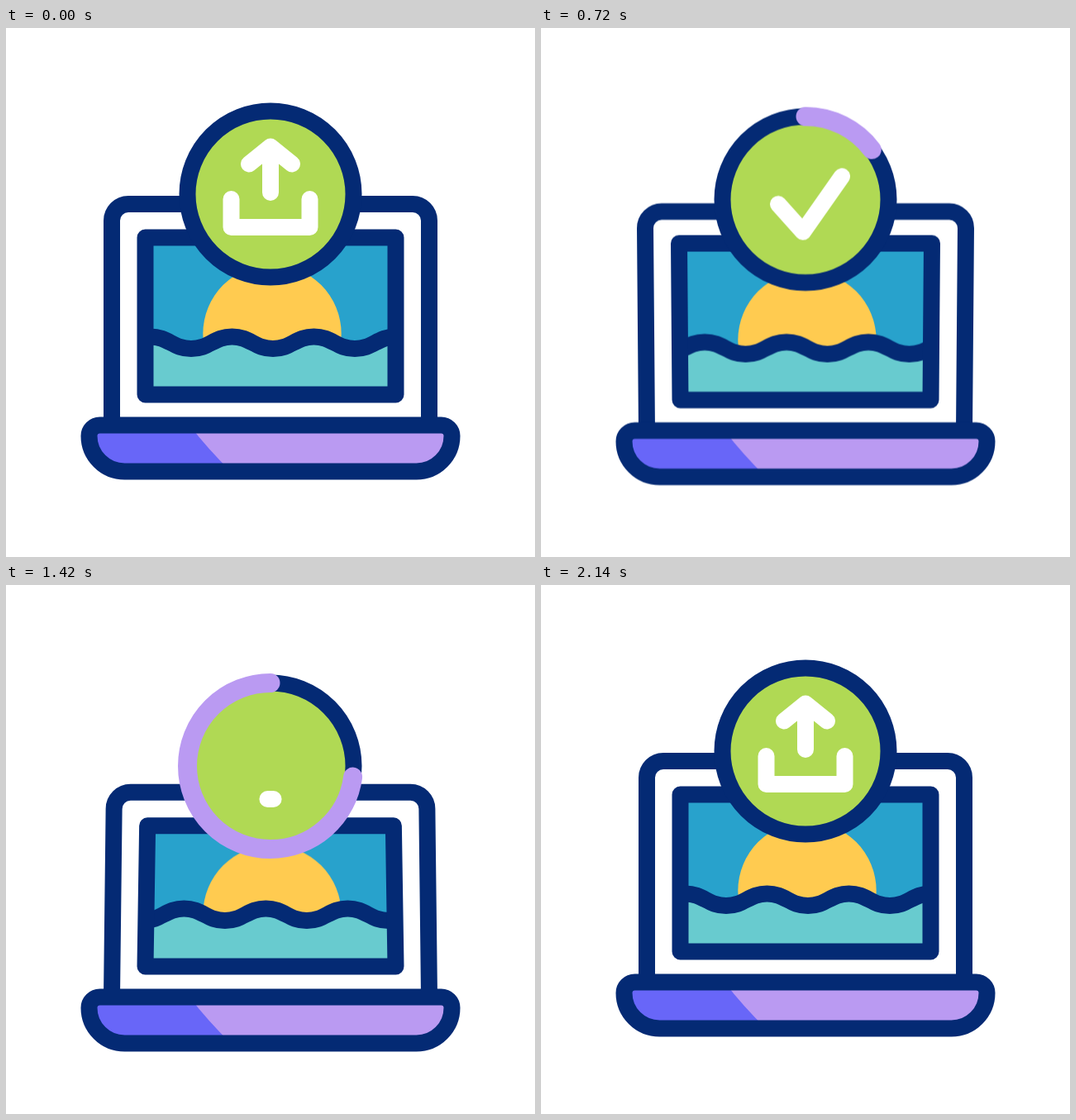
Write an HTML page without scripts that moves like this. It is 640 px wide and 640 px high and loops after 2.3 s.

```html
<!DOCTYPE html>
<html lang="en">
<head>
<meta charset="utf-8">
<title>Laptop upload</title>
<style>
html, body { margin: 0; width: 100%; height: 100%; overflow: hidden; background: #fff; }
svg { display: block; width: 100vw; height: 100vh; }

.line { fill: none; stroke: #042a74; stroke-width: 20; stroke-linejoin: round; }
.glyph { fill: none; stroke: #fff; stroke-width: 20; stroke-linecap: round; stroke-linejoin: round; }
.draw { stroke-dasharray: 100 200; }

.all, .lid, .screen, .sun, .wave, .arrow, .tray, .check, .progress {
  animation: 2.3s cubic-bezier(.37, 0, .63, 1) infinite;
}
.all { animation-name: bob; }
.lid { animation-name: lid; }
.screen { animation-name: screen; }
.sun { animation-name: sun; }
.wave { animation-name: wave; }
.arrow { animation-name: arrow; }
.tray { animation-name: tray; }
.check { animation-name: check; }
.progress { animation-name: progress; }

@keyframes bob {
  0%, 9.2% { transform: translateY(0); }
  19.13% { transform: translateY(-12px); animation-timing-function: cubic-bezier(.4, 0, .6, .65); }
  31.3% { transform: translateY(6.5px); animation-timing-function: cubic-bezier(.3, .6, .6, 1); }
  55.65%, 56.52% { transform: translateY(22.3px); animation-timing-function: cubic-bezier(.45, 0, .7, .5); }
  67.83% { transform: translateY(2px); animation-timing-function: cubic-bezier(.3, .36, .5, 1); }
  73.48% { transform: translateY(-12px); animation-timing-function: cubic-bezier(.4, 0, .7, .7); }
  78.26% { transform: translateY(-8px); animation-timing-function: cubic-bezier(.3, .4, .6, 1); }
  92.2%, 100% { transform: translateY(0); }
}

/* the lid tips back and forth on its hinge */
@keyframes lid {
  0%, 9.2%, 92.2%, 100% { d: path("M128 480L128 233a20 20 0 0 1 20 -20L492 213a20 20 0 0 1 20 20L512 480"); }
  16.52% { d: path("M128 480L126 229a20 20 0 0 1 20 -20L494 209a20 20 0 0 1 20 20L512 480"); animation-timing-function: ease-out; }
  21.74% { d: path("M128 480L124.5 227a20 20 0 0 1 20 -20L495.5 207a20 20 0 0 1 20 20L512 480"); animation-timing-function: ease-in; }
  31.3% { d: path("M128 480L126 235.5a20 20 0 0 1 20 -20L494 215.5a20 20 0 0 1 20 20L512 480"); animation-timing-function: ease-out; }
  53.04%, 57.4% { d: path("M128 480L131 254.5a20 20 0 0 1 20 -20L489 234.5a20 20 0 0 1 20 20L509 254.5 512 480"); d: path("M128 480L131 254.5a20 20 0 0 1 20 -20L489 234.5a20 20 0 0 1 20 20L512 480"); }
  67.83% { d: path("M128 480L130 250a20 20 0 0 1 20 -20L490 230a20 20 0 0 1 20 20L512 480"); }
  77%, 78.26% { d: path("M128 480L123 224a20 20 0 0 1 20 -20L497 204a20 20 0 0 1 20 20L512 480"); }
}
@keyframes screen {
  0%, 9.2%, 92.2%, 100% { d: path("M168.5 443.5L168.5 253.5 471.5 253.5 471.5 443.5Z"); }
  16.52% { d: path("M168.5 443.5L167.3 250.5 472.7 250.5 471.5 443.5Z"); animation-timing-function: ease-out; }
  21.74% { d: path("M168.5 443.5L166 249 474 249 471.5 443.5Z"); animation-timing-function: ease-in; }
  31.3% { d: path("M168.5 443.5L167 254 473 254 471.5 443.5Z"); animation-timing-function: ease-out; }
  53.04%, 57.4% { d: path("M168.5 443.5L171.5 275 468.5 275 471.5 443.5Z"); }
  67.83% { d: path("M168.5 443.5L170.5 270.5 469.5 270.5 471.5 443.5Z"); }
  77%, 78.26% { d: path("M168.5 443.5L165.2 247.5 474.8 247.5 471.5 443.5Z"); }
}
@keyframes sun {
  0%, 9.2%, 92.2%, 100% { transform: translateY(0); }
  21.74% { transform: translateY(-3px); }
  31.3% { transform: translateY(1px); }
  53.04%, 57.4% { transform: translateY(10.5px); }
  67.83% { transform: translateY(10px); }
  77%, 78.26% { transform: translateY(-5px); }
}
@keyframes wave {
  0%, 20.87% { transform: translateX(0); }
  53.04%, 53.91% { transform: translateX(99px); }
  53.92% { transform: translateX(0); animation-timing-function: cubic-bezier(.4, 0, .7, .8); }
  67.83% { transform: translateX(88px); animation-timing-function: cubic-bezier(.2, .5, .5, 1); }
  76.5%, 100% { transform: translateX(99px); }
}
@keyframes arrow {
  0%, 9.2% { transform: translateY(0); }
  16.52%, 17.4% { transform: translateY(12px); animation-timing-function: ease-in; }
  24.35% { transform: translateY(-165px); animation-timing-function: step-end; }
  67.83% { transform: translateY(165px); animation-timing-function: cubic-bezier(.2, .4, .4, 1); }
  76%, 78.26% { transform: translateY(-12px); }
  88%, 100% { transform: translateY(0); }
}
@keyframes tray {
  0%, 19.13% { stroke-dashoffset: 0; opacity: 1; }
  26.08% { stroke-dashoffset: 99; opacity: 1; }
  26.09%, 60.9% { stroke-dashoffset: 99; opacity: 0; }
  60.91% { stroke-dashoffset: 99; opacity: 1; }
  67.83% { stroke-dashoffset: 10.5; opacity: 1; animation-timing-function: ease-out; }
  70.5%, 100% { stroke-dashoffset: 0; opacity: 1; }
}
@keyframes check {
  0%, 25.2% { stroke-dashoffset: 99; opacity: 0; }
  25.21% { stroke-dashoffset: 99; opacity: 1; }
  30.8%, 54.78% { stroke-dashoffset: 0; opacity: 1; }
  60.87% { stroke-dashoffset: -99; opacity: 1; }
  60.88%, 100% { stroke-dashoffset: -99; opacity: 0; }
}
@keyframes progress {
  0%, 24.34% { stroke-dashoffset: 99.9; opacity: 0; }
  24.35% { stroke-dashoffset: 99.9; opacity: 1; }
  52.17%, 54.78% { stroke-dashoffset: 0; opacity: 1; }
  74.78% { stroke-dashoffset: -99.9; opacity: 1; }
  74.79%, 100% { stroke-dashoffset: -99.9; opacity: 0; }
}
</style>
</head>
<body>
<svg viewBox="0 0 640 640">
  <defs>
    <clipPath id="view"><rect x="168.5" y="240" width="303" height="203.5"/></clipPath>
    <clipPath id="disc"><circle cx="320" cy="201" r="100"/></clipPath>
    <path id="swell" d="M0 0c22 0 27.5 14.5 49.5 14.5s27.5 -14.5 49.5 -14.5"/>
  </defs>
  <g class="all">
    <path class="line lid" d="M128 480L128 233a20 20 0 0 1 20 -20L492 213a20 20 0 0 1 20 20L512 480"/>
    <path class="screen" fill="#28a2cc" d="M168.5 443.5L168.5 253.5 471.5 253.5 471.5 443.5Z"/>
    <g clip-path="url(#view)">
      <circle class="sun" cx="322" cy="370" r="83.7" fill="#ffcb50"/>
      <g class="wave">
        <path fill="#68cbcf" stroke="#042a74" stroke-width="20" d="M-23.5 373.5
          c22 0 27.5 14.5 49.5 14.5s27.5 -14.5 49.5 -14.5
          s27.5 14.5 49.5 14.5s27.5 -14.5 49.5 -14.5
          s27.5 14.5 49.5 14.5s27.5 -14.5 49.5 -14.5
          s27.5 14.5 49.5 14.5s27.5 -14.5 49.5 -14.5
          s27.5 14.5 49.5 14.5s27.5 -14.5 49.5 -14.5
          s27.5 14.5 49.5 14.5s27.5 -14.5 49.5 -14.5
          V480H-23.5Z"/>
      </g>
    </g>
    <path class="line screen" d="M168.5 443.5L168.5 253.5 471.5 253.5 471.5 443.5Z"/>

    <path fill="#ba9af2" d="M113.5 480.5H526.5a13 13 0 0 1 13 13a43 43 0 0 1 -43 43H143.5a43 43 0 0 1 -43 -43a13 13 0 0 1 13 -13Z"/>
    <path fill="#6866f8" d="M222 480.5Q244 509 272 536.5H143.5a43 43 0 0 1 -43 -43a13 13 0 0 1 13 -13Z"/>
    <path class="line" d="M113.5 480.5H526.5a13 13 0 0 1 13 13a43 43 0 0 1 -43 43H143.5a43 43 0 0 1 -43 -43a13 13 0 0 1 13 -13Z"/>

    <circle cx="320" cy="201" r="100" fill="#b0d954"/>
    <g clip-path="url(#disc)">
      <path class="glyph arrow" d="M294 164.5L320 143.5 346 164.5M320 145V199"/>
      <path class="glyph draw tray" pathLength="100" d="M320 241H272.5V207"/>
      <path class="glyph draw tray" pathLength="100" d="M320 241H367.5V207"/>
      <path class="glyph draw check" pathLength="100" d="M287 206.5L317 240 364 173"/>
    </g>
    <circle class="line" cx="320" cy="201" r="100.5"/>
    <path class="draw progress" pathLength="100" fill="none" stroke="#ba9af2" stroke-width="23" stroke-linecap="round"
      d="M320 100.5a100.5 100.5 0 0 1 0 201a100.5 100.5 0 0 1 0 -201"/>
  </g>
</svg>
</body>
</html>
```
